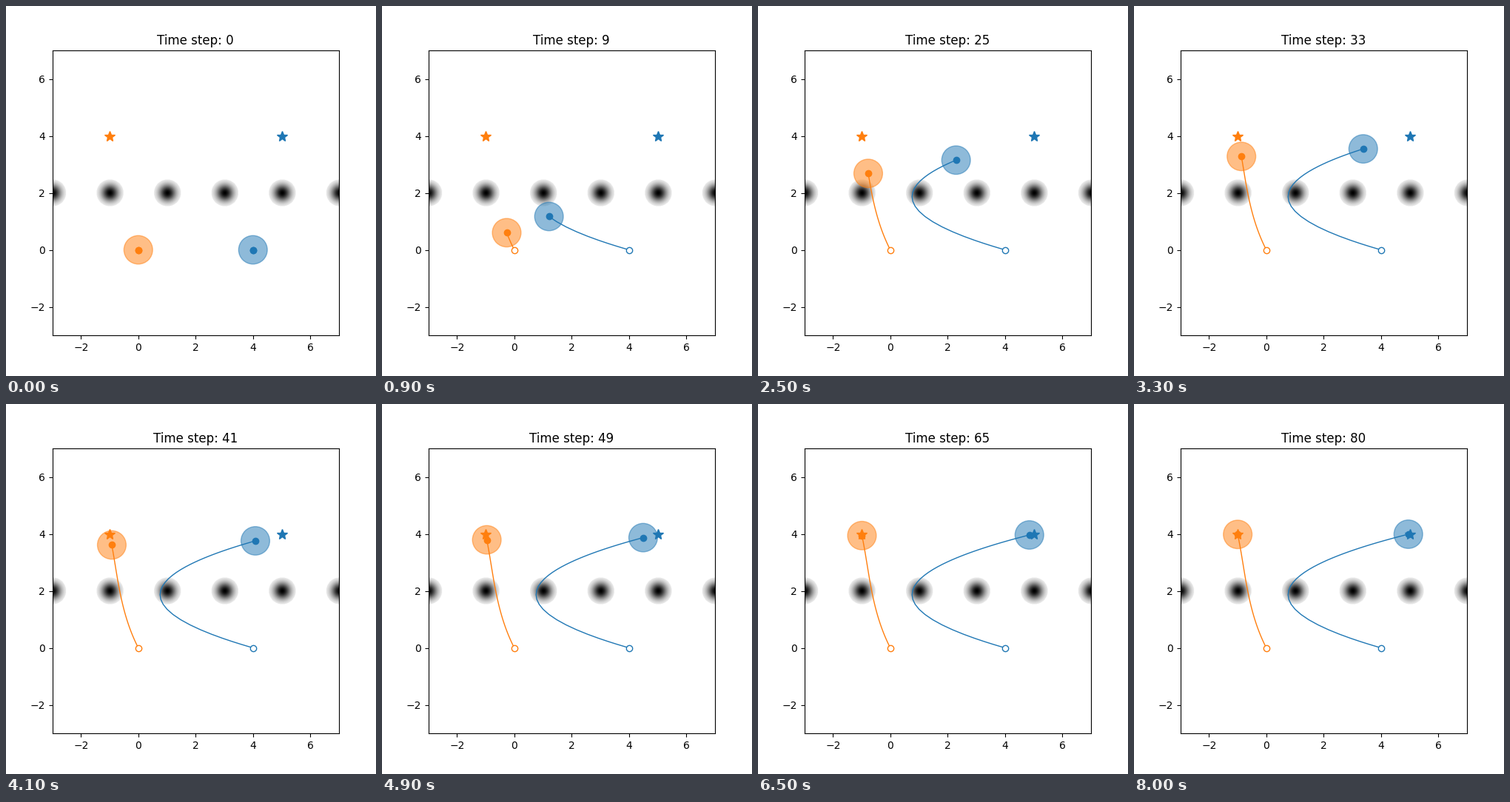
Write a matplotlib script that moves like this. It is 500 px wide and 500 px high and loops after 8.1 s.

```python
import numpy as np
import matplotlib.pyplot as plt
from matplotlib.animation import FuncAnimation
from matplotlib.patches import Circle

STEPS = 81
INTERVAL = 100
LOW, HIGH = -3, 7
GOAL_Y = 4


def approach(t, rate, lag, ramp):
    """Height at time t: a soft start, then exponential decay to the goal."""
    return GOAL_Y * (1 - np.exp(-rate * t + lag * np.tanh(ramp * t)))


def orange_path(t):
    y = approach(t, 0.078, 0.87, 0.0805)
    x = -y / 4 - (0.064 - 0.0135 * y) * y * (GOAL_Y - y)
    return x, y


def blue_path(t):
    y = approach(t, 0.0778, 0.397, 0.159)
    x = 4 - 3.473 * y + 0.9308 * y**2
    return x, y


def obstacle_field(size=770, sigma=0.21, reach=0.47):
    """Row of dark Gaussian spots, cut off at a fixed radius."""
    step = (HIGH - LOW) / size
    grid = LOW + step * (np.arange(size) + 0.5)
    x, y = np.meshgrid(grid, grid)
    dx = (x - LOW + 1) % 2 - 1
    r2 = dx**2 + (y - 2) ** 2
    return np.where(r2 < reach**2, np.exp(-r2 / (2 * sigma**2)), 0)


class Agent:
    def __init__(self, ax, path, goal, color):
        self.x, self.y = path(np.arange(STEPS))
        start = self.x[0], self.y[0]
        self.body = ax.add_patch(Circle(start, 0.5, color=color, alpha=0.5))
        self.trail, = ax.plot([], [], color=color, lw=1)
        ax.plot(*start, "o", color=color, mfc="white")
        self.dot, = ax.plot(*start, "o", color=color)
        ax.plot(*goal, "*", color=color, ms=10)

    def move(self, step):
        here = self.x[step], self.y[step]
        self.body.center = here
        self.dot.set_data([here[0]], [here[1]])
        self.trail.set_data(self.x[:step + 1], self.y[:step + 1])


fig, ax = plt.subplots(figsize=(5, 5), dpi=100)
ax.imshow(obstacle_field(), cmap="gray_r", vmin=0, vmax=1, origin="lower",
          extent=(LOW, HIGH, LOW, HIGH), aspect="auto")
agents = [
    Agent(ax, blue_path, (5, GOAL_Y), "tab:blue"),
    Agent(ax, orange_path, (-1, GOAL_Y), "tab:orange"),
]
ticks = range(-2, 7, 2)
ax.set(xlim=(LOW, HIGH), ylim=(LOW, HIGH), xticks=ticks, yticks=ticks)
title = ax.set_title("Time step: 0")


def update(step):
    for agent in agents:
        agent.move(step)
    title.set_text(f"Time step: {step}")


anim = FuncAnimation(fig, update, frames=STEPS, init_func=lambda: update(0),
                     interval=INTERVAL, repeat=True, repeat_delay=0)
plt.show()
```
